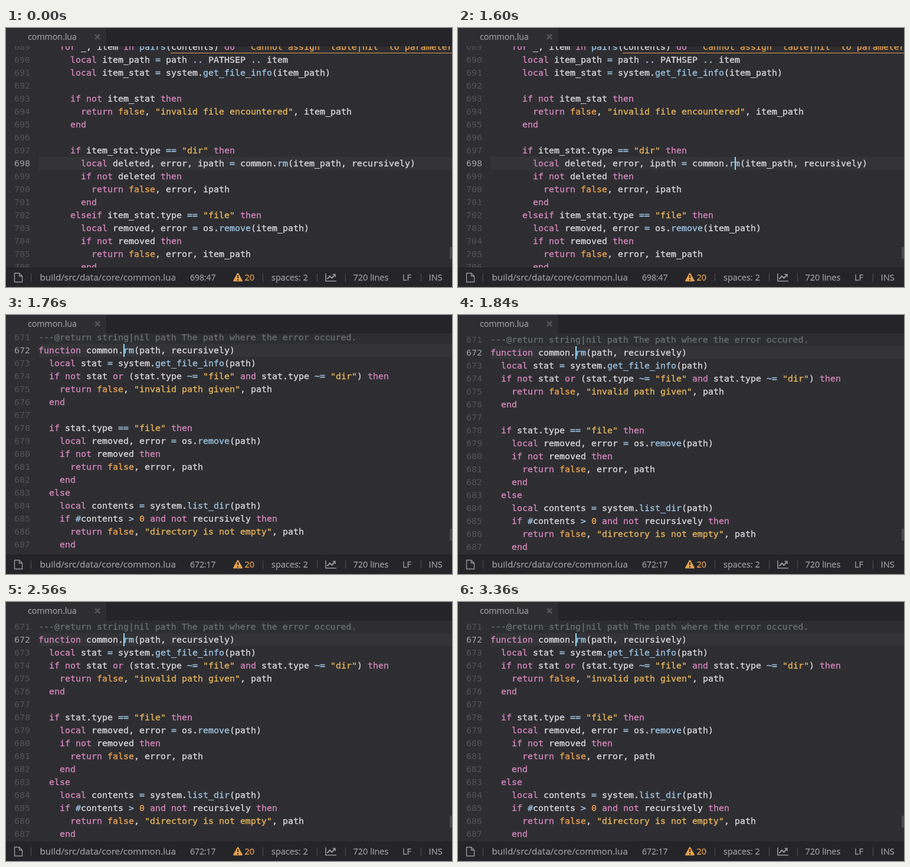
Write an HTML page with a canvas that moves like this. It is 756 px wide and 440 px high and loops after 3.44 s.

```html
<!DOCTYPE html>
<html lang="en">
<head>
<meta charset="utf-8">
<title>Code editor</title>
<style>
  html, body { margin: 0; width: 756px; height: 440px; overflow: hidden; background: #2e2e32; }
  canvas { display: block; width: 756px; height: 440px; }
</style>
</head>
<body>
<canvas id="stage"></canvas>
<script>
const W = 756, H = 440, LOOP = 3440, STEP = 40;
const TOP = 31, BOTTOM = 407;
const LINE = 22, CHAR = 9, LEFT = 55, FIRST = 671;
const JUMP = 1650, FOCUS = 600, SCROLL = 406;
const MONO = '14.95px "DejaVu Sans Mono", "Noto Sans Mono", monospace';

const C = {
  bg: '#2e2e32', bar: '#252529', divider: '#202024', highlight: '#343438',
  text: '#97979c', dim: '#525257', number: '#525259', activeNumber: '#a0a0a8',
  scrollbar: '#48484d', caret: '#93ddfa', warn: '#e2a04e',
  normal: '#d4d4d8', comment: '#676b6f', keyword: '#d084b8',
  literal: '#e5a050', string: '#e2b25a', blue: '#9abfdc'
};

const code = `---@return string|nil path The path where the error occured.
function common.rm(path, recursively)
  local stat = system.get_file_info(path)
  if not stat or (stat.type ~= "file" and stat.type ~= "dir") then
    return false, "invalid path given", path
  end

  if stat.type == "file" then
    local removed, error = os.remove(path)
    if not removed then
      return false, error, path
    end
  else
    local contents = system.list_dir(path)
    if #contents > 0 and not recursively then
      return false, "directory is not empty", path
    end

    for _, item in pairs(contents) do
      local item_path = path .. PATHSEP .. item
      local item_stat = system.get_file_info(item_path)

      if not item_stat then
        return false, "invalid file encountered", item_path
      end

      if item_stat.type == "dir" then
        local deleted, error, ipath = common.rm(item_path, recursively)
        if not deleted then
          return false, error, ipath
        end
      elseif item_stat.type == "file" then
        local removed, error = os.remove(item_path)
        if not removed then
          return false, error, item_path
        end`;

const keywords = new Set('local if not then return end for in do function else elseif and or'.split(' '));

function colorOf(word, next) {
  if (word.startsWith('--')) return C.comment;
  if (word[0] === '"') return C.string;
  if (keywords.has(word)) return C.keyword;
  if (word === 'false' || /^\d/.test(word)) return C.literal;
  if (/^\w/.test(word)) return next === '(' ? C.blue : C.normal;
  return /^([=~#>]|\.\.)/.test(word) ? C.blue : C.normal;
}

function tokenize(line) {
  const pattern = /--.*|"[^"]*"|\w+|\.\.|[=~]=|[^\s\w]/g;
  return [...line.matchAll(pattern)].map(m => ({
    text: m[0],
    x: LEFT + m.index * CHAR,
    color: colorOf(m[0], line[m.index + m[0].length])
  }));
}

const lines = code.split('\n').map(tokenize);

const canvas = document.getElementById('stage');
const ctx = canvas.getContext('2d');
const ratio = window.devicePixelRatio || 1;
canvas.width = W * ratio;
canvas.height = H * ratio;
ctx.scale(ratio, ratio);

function rect(x, y, w, h, color) {
  ctx.fillStyle = color;
  ctx.fillRect(x, y, w, h);
}

// a thin outline gives the letters a medium weight
function text(str, x, y, color, font, weight = 0.4) {
  ctx.font = font;
  ctx.fillStyle = ctx.strokeStyle = color;
  ctx.lineWidth = weight;
  ctx.lineJoin = 'round';
  ctx.fillText(str, x, y);
  if (weight) ctx.strokeText(str, x, y);
}

function label(str, x, y, size = 14.5, color = C.text) {
  text(str, x, y, color, size + 'px "Open Sans", "Noto Sans", sans-serif', 0.3);
}

function path(points, color, width, closed) {
  ctx.beginPath();
  points.forEach(([x, y]) => ctx.lineTo(x, y));
  if (closed) ctx.closePath();
  ctx.strokeStyle = color;
  ctx.lineWidth = width;
  ctx.stroke();
}

function drawCode(scroll, jumped, caretOn) {
  const active = jumped ? 672 : 698;
  const middle = n => Math.round(230 + (n - 698) * LINE + scroll);

  ctx.save();
  ctx.beginPath();
  ctx.rect(0, TOP, W, BOTTOM - TOP);
  ctx.clip();

  const activeTop = middle(active) - 11;
  rect(LEFT, activeTop, W - LEFT, LINE, C.highlight);

  lines.forEach((tokens, i) => {
    const n = FIRST + i, y = middle(n);
    if (y < TOP - LINE || y > BOTTOM + LINE) return;
    text(n, 14, y + 5, n === active ? C.activeNumber : C.number, MONO, 0);
    tokens.forEach(t => text(t.text, t.x, y + 5, t.color, MONO));
    if (n === 689) {
      text('Cannot assign `table|nil` to parameter', 415, y + 5, C.warn, MONO);
      rect(279, y + 10, W - 279, 1, C.warn);
    }
  });

  if (caretOn) rect(LEFT + (jumped ? 16 : 46) * CHAR, activeTop, 2, LINE, C.caret);
  rect(752, Math.round(372 - scroll * 0.0225), 4, 20, C.scrollbar);
  ctx.restore();
}

function drawTabs() {
  rect(0, 0, W, 30, C.bar);
  rect(0, 0, 170, TOP, C.bg);
  rect(170, 0, 1, 30, C.divider);
  rect(170, 30, W - 170, 1, C.divider);
  label('common.lua', 37, 20, 14.2);
  path([[151, 11], [159, 19]], C.dim, 2.8);
  path([[159, 11], [151, 19]], C.dim, 2.8);
}

function drawStatus(jumped) {
  rect(0, BOTTOM, W, H - BOTTOM, C.bar);
  rect(0, BOTTOM, W, 1, C.divider);

  // page
  ctx.lineJoin = 'round';
  path([[14.5, 416.5], [22.5, 416.5], [27.5, 421.5], [27.5, 431.5], [14.5, 431.5]], C.text, 1.4, true);
  path([[22.5, 416.5], [22.5, 421.5], [27.5, 421.5]], C.text, 1.3);

  // warning
  ctx.fillStyle = C.warn;
  path([[393, 417], [400, 429.5], [386, 429.5]], C.warn, 2, true);
  ctx.fill();
  rect(392, 420, 2, 5, C.bar);
  rect(392, 427, 2, 2, C.bar);

  // chart
  ctx.lineJoin = 'miter';
  path([[542, 417], [542, 430], [560, 430]], C.text, 1.6);
  path([[544.5, 426.5], [549, 421.5], [552.5, 425], [557.5, 419]], C.text, 2);
  path([[553.5, 418.5], [558, 418.5], [558, 423]], C.text, 1.6);

  [42, 435, 527, 575, 703].forEach(x => rect(x, 417, 1, 14, C.dim));
  label('build/src/data/core/common.lua', 57.5, 429, 15.25);
  label(jumped ? '672:17' : '698:47', 312, 429, 13.9);
  label('20', 404.5, 429, 14.5, C.warn);
  label('spaces: 2', 450, 429);
  label('720 lines', 588.5, 429);
  label('LF', 672, 429);
  label('INS', 716.5, 429, 14.8);
}

function draw(now) {
  const t = Math.floor((now % LOOP) / STEP) * STEP;
  const jumped = t >= JUMP;
  // the remaining distance halves every sixtieth of a second
  const scroll = jumped ? SCROLL * (1 - 0.5 ** ((t - JUMP) * 0.06)) : 0;
  const since = t - (jumped ? JUMP : FOCUS);
  const caretOn = since >= 0 && since % 800 < 400;

  rect(0, 0, W, H, C.bg);
  drawCode(scroll, jumped, caretOn);
  drawTabs();
  drawStatus(jumped);
}

const start = performance.now();
function tick() {
  draw(performance.now() - start);
  requestAnimationFrame(tick);
}
tick();
</script>
</body>
</html>
```
